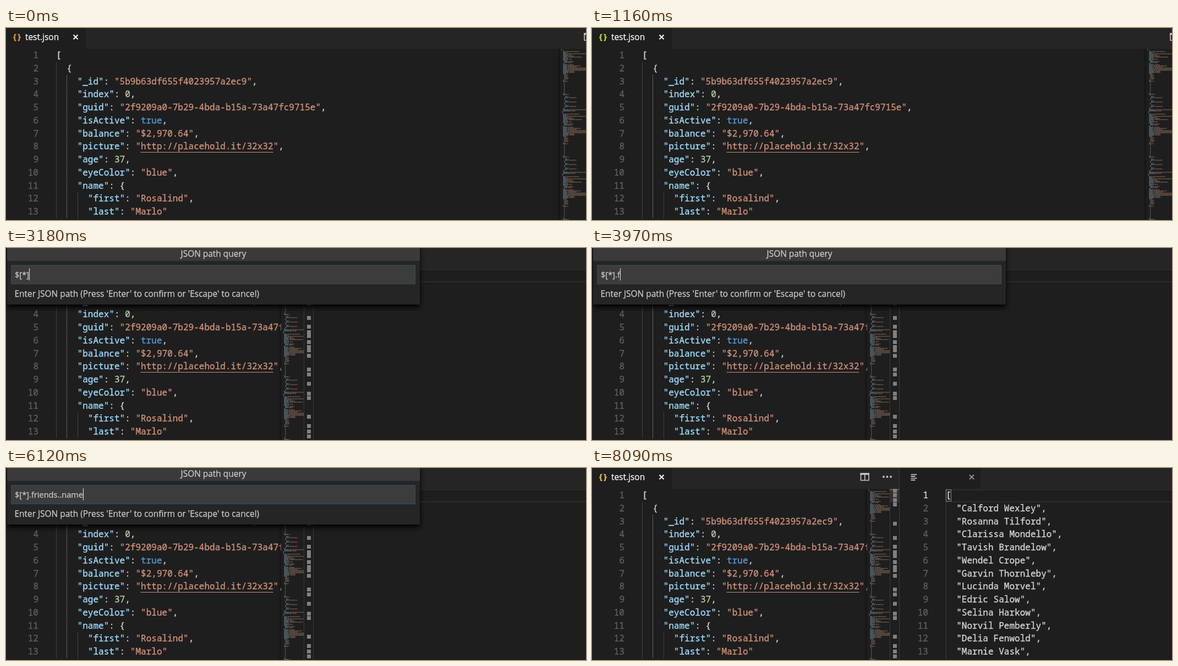
Recreate the animation shown at these times as an HTML page. Size 1054x350 px, loop 8.61 s.

```html
<!DOCTYPE html>
<html lang="en">
<head>
<meta charset="utf-8">
<title>JSON path query</title>
<style>
  html, body { margin: 0; width: 100%; height: 100%; overflow: hidden; background: #1e1e1e; }
  svg { display: block; width: 1054px; height: 350px; }
  text { white-space: pre; stroke-width: .35px; }
  .code { font: 16.04px "Noto Sans Mono", "DejaVu Sans Mono", monospace; fill: #d4d4d4; stroke: #d4d4d4; }
  .num { fill: #5f5f5f; stroke: #5f5f5f; text-anchor: end; }
  .active { fill: #d8d8d8; stroke: #d8d8d8; }
  .ui { font: 15.45px "Open Sans", "Noto Sans", sans-serif; fill: #ccc; stroke: #ccc; stroke-width: .25px; }
  .input { font-size: 14.6px; }
  .title { fill: #fff; stroke: #fff; }
  .braces { font-size: 14px; font-weight: 700; stroke-width: .6px; }
  .shadow { filter: drop-shadow(0 5px 5px #000); }
</style>
</head>
<body>
<svg id="stage" viewBox="0 0 1054 350"></svg>
<script>
const LOOP = 8610, CHAR = 9.624, ROW = 23.75, TOP = 38, BLINK = 460;
const stage = document.getElementById('stage');

function add(parent, tag, attrs = {}, text) {
  const node = document.createElementNS('http://www.w3.org/2000/svg', tag);
  for (const key in attrs) node.setAttribute(key, attrs[key]);
  if (text !== undefined) node.textContent = text;
  parent.append(node);
  return node;
}
const group = (parent, attrs) => add(parent, 'g', attrs);
const rect = (parent, x, y, width, height, fill, more) =>
  add(parent, 'rect', { x, y, width, height, fill, ...more });
const stroke = (parent, d, color, width = 1, more) =>
  add(parent, 'path', { d, stroke: color, 'stroke-width': width, fill: 'none', ...more });
const label = (parent, x, y, text, more) => add(parent, 'text', { x, y, class: 'ui', ...more }, text);
const show = (node, on) => node.setAttribute('visibility', on ? 'inherit' : 'hidden');

// Editor text
const doc = [
  '[',
  '  {',
  '    "_id": "5b9b63df655f4023957a2ec9",',
  '    "index": 0,',
  '    "guid": "2f9209a0-7b29-4bda-b15a-73a47fc9715e",',
  '    "isActive": true,',
  '    "balance": "$2,970.64",',
  '    "picture": "http://placehold.it/32x32",',
  '    "age": 37,',
  '    "eyeColor": "blue",',
  '    "name": {',
  '      "first": "Rosalind",',
  '      "last": "Marlo"'
];
const people = ['Calford Wexley', 'Rosanna Tilford', 'Clarissa Mondello', 'Tavish Brandelow',
  'Wendel Crope', 'Garvin Thornleby', 'Lucinda Morvel', 'Edric Salow', 'Selina Harkow',
  'Norvil Pemberly', 'Delia Fenwold', 'Marnie Vask'];
const friendDoc = ['[', '  ['];
people.slice(0, 3).forEach((name, id) =>
  friendDoc.push('    {', `      "id": ${id},`, `      "name": "${name}"`, '    },'));
const nameDoc = ['[', ...people.map(name => `  "${name}",`)];
const wrappedDoc = ['[', ...doc.map(line => '  ' + line)];

function tokenColor(token, rest) {
  if (token[0] === '"') return rest[0] === ':' ? '#9cdcfe' : '#ce9178';
  if (/^\d/.test(token)) return '#b5cea8';
  return token === 'true' ? '#569cd6' : '#d4d4d4';
}

function editor(parent, lines, x, numX, colored, activeLine) {
  const view = group(parent);
  lines.slice(0, 13).forEach((line, i) => {
    const top = TOP + i * ROW, y = top + 17;
    const indent = line.search(/\S/), body = line.trim();
    for (let level = 0; level < indent; level += 2) {
      const gx = Math.round(x + level * CHAR) + 0.5;
      stroke(view, `M${gx} ${top}v${ROW + 0.2}`, colored && level === 2 ? '#5c5c5c' : '#404040');
    }
    add(view, 'text', { x: numX, y, class: 'code num' + (i === activeLine ? ' active' : '') }, i + 1);
    const text = add(view, 'text', { x: x + indent * CHAR, y, class: 'code' });
    if (!colored) { text.textContent = body; return; }
    for (const m of body.matchAll(/"[^"]*"|\w+|[^"\w]+/g)) {
      const color = tokenColor(m[0], body.slice(m.index + m[0].length));
      add(text, 'tspan', { fill: color, stroke: color }, m[0]);
    }
  });
  return view;
}

// Minimap: one record is 57 short lines, drawn as dashes
function recordLines() {
  const lines = [[2, 0, 1]];
  const field = (indent, key, value) => lines.push([indent, key, value]);
  const close = indent => field(indent, 0, 2);
  [[5, 26], [7, 1], [6, 38], [10, 4], [9, 11], [9, 27], [5, 2], [10, 6], [6, 1]]
    .forEach(([key, value]) => field(4, key, value));
  field(6, 7, 10); field(6, 6, 7); close(4);
  [[9, 10], [7, 27], [7, 19], [9, 46], [7, 60], [12, 34], [10, 11], [11, 10]]
    .forEach(([key, value]) => field(4, key, value));
  field(4, 6, 1);
  for (let i = 0; i < 5; i++) field(6, 0, 5 + i * 3 % 5);
  close(4);
  field(4, 7, 1);
  for (let i = 0; i < 10; i++) field(6, 0, 1);
  close(4);
  field(4, 9, 1);
  for (let i = 0; i < 3; i++) { field(6, 0, 1); field(8, 4, 1); field(8, 6, 15); close(6); }
  close(4);
  field(4, 10, 52); field(4, 15, 8); close(2);
  return lines;
}

function minimap(parent, x, width) {
  const map = add(parent, 'svg', { x, y: TOP, width, height: 312 });
  rect(map, 0, 0, width, 312, '#1e1e1e');
  let keys = 'M2 1h1', values = '';
  for (let r = 0; r < 3; r++)
    recordLines().forEach(([indent, key, value], i) => {
      const y = 3 + (r * 57 + i) * 2, left = 2 + indent * 0.9;
      if (key) keys += `M${left} ${y}h${key * 0.9}`;
      const run = `M${left + (key ? key * 0.9 + 1.5 : 0)} ${y}h${value * 0.9}`;
      if (value > 2) values += run; else keys += run;
    });
  const dash = { 'stroke-dasharray': '2.2 .6 1.4 .5', opacity: 0.75 };
  stroke(map, keys, '#b4d8ea', 1.1, dash);
  stroke(map, values, '#d0a080', 1.1, dash);
  rect(parent, x - 6, TOP, 6, 312, 'url(#edge)');
}

const cross = (parent, x, y, color) =>
  stroke(parent, `M${x - 4} ${y - 4}l8 8m0 -8l-8 8`, color, 2.2);

function splitIcon(parent, x) {
  stroke(parent, `M${x + 1} 10v12.5h14.5v-12.5m-7.2 0v12.5`, '#c5c5c5', 1.6);
  rect(parent, x, 9, 16.5, 3.5, '#c5c5c5');
}

const defs = add(stage, 'defs');
const edge = add(defs, 'linearGradient', { id: 'edge' });
add(edge, 'stop', { offset: 0, 'stop-color': '#000', 'stop-opacity': 0 });
add(edge, 'stop', { offset: 1, 'stop-color': '#000', 'stop-opacity': 0.3 });

// Left editor
rect(stage, 0, 0, 1054, 350, '#1e1e1e');
rect(stage, 145, 0, 909, TOP, '#252526');
const braces = add(stage, 'text', { x: 11.5, y: 21, class: 'code braces' }, '{}');
label(stage, 35, 22, 'test.json', { class: 'ui title' });
cross(stage, 126.5, 16.5, '#f0f0f0');
editor(stage, doc, 91.1, 59, true);
stroke(stage, 'M244.5 226.5h241', '#ce9178');
const single = group(stage);
minimap(single, 1007, 47);
splitIcon(single, 1050);

// Right editor
const split = group(stage);
rect(split, 500, TOP, 554, 312, '#1e1e1e');
minimap(split, 500, 41);
splitIcon(split, 487.5);
for (let i = 0; i < 3; i++) add(split, 'circle', { cx: 530 + i * 6.5, cy: 16, r: 1.9, fill: '#c5c5c5' });
rect(split, 541, TOP, 17, 312, '#1e1e1e');
stroke(split, `M541.5 ${TOP}v312`, '#3a3a3a');
stroke(split, 'M541 39.5h17', '#686868', 2);
for (const y of [38, 46, 55, 63, 98, 124, 140, 150, 157, 168, 193, 218, 227, 244, 262, 270, 304, 321, 331, 340])
  rect(split, 547, y, 7, 7, '#808080');
rect(split, 547, 177, 7, 13, '#808080');
const slider = rect(split, 542, 41, 16, 22, '#797979', { opacity: 0.2 });
rect(split, 558, 0, 1, 350, '#3a3a3a');
rect(split, 559, 0, 147, TOP, '#1e1e1e');
stroke(split, 'M579.5 11.7h11m-11 3.4h8m-8 3.4h11m-11 3.4h8', '#d0d0d0', 1.6);
cross(split, 690, 16.5, '#8a8a8a');
rect(split, 643, 39.5, 440, 22, 'none', { stroke: '#2c2c2c', 'stroke-width': 2 });
const views = {
  empty: editor(split, [''], 643, 611, false, 0),
  whole: editor(split, wrappedDoc, 652.6, 620.5, false, 0),
  items: editor(split, doc, 652.6, 620.5, false, 0),
  friends: editor(split, friendDoc, 652.6, 620.5, false, 0),
  names: editor(split, nameDoc, 643, 611, false, 0)
};
// Matching bracket box
rect(views.names, 643.5, 39.5, 9, 21, 'none', { stroke: '#888' });

// Command list
const palette = group(stage);
rect(palette, 2, 2, 750, 360, '#252526', { class: 'shadow' });
rect(palette, 9, 9, 735, 35, '#3c3c3c');
label(palette, 16, 32, '>', { class: 'ui input' });
const paletteCaret = rect(palette, 26, 15, 1, 22, '#e0e0e0');
rect(palette, 2, 51, 750, 27.5, '#094771');
['JSON path query', 'Format Document', 'Change Language Mode', 'Toggle Word Wrap', 'Reload Window',
  'Open User Settings', 'Fold All', 'Unfold All', 'Go to Line...', 'Split Editor', 'Close Editor']
  .forEach((name, i) => label(palette, 16, 70 + i * 27.5, name));

// Query prompt
const prompt = group(stage);
rect(prompt, 2, -6, 750, 109, '#252526', { class: 'shadow' });
rect(prompt, 2, 0, 750, 23.5, '#3a3a3b');
label(prompt, 377, 16, 'JSON path query', { 'text-anchor': 'middle' });
rect(prompt, 9.5, 31.5, 734, 34, '#3c3c3c', { stroke: '#265069' });
const query = label(prompt, 16, 54, '', { class: 'ui input' });
label(prompt, 15.5, 89, "Enter JSON path (Press 'Enter' to confirm or 'Escape' to cancel)");
const caret = rect(prompt, 16, 37, 1, 22, '#e8e8e8');

// Timeline
const typing = [[1240, ''], [2100, '$'], [2730, '$['], [3040, '$[*'], [3180, '$[*]'], [3650, '$[*].']];
function type(start, end, word) {
  const base = typing[typing.length - 1][1];
  for (let i = 0; i < word.length; i++)
    typing.push([start + (end - start) * i / (word.length - 1), base + word.slice(0, i + 1)]);
}
type(3970, 4660, 'friends');
type(5430, 6120, '..name');
typing.push([6210, '$[*].friends..name']);

const results = [[0, 'empty'], [2400, 'whole'], [2730, 'empty'], [3410, 'items'], [3650, 'empty'],
  [4880, 'friends'], [5430, 'empty'], [6280, 'names']];
const iconColors = [[0, '#d7954a'], [460, '#cbcb41'], [2100, '#e0bd4c']];

const latest = (steps, t) => steps.filter(step => step[0] <= t).pop() || steps[0];
const blinkOn = elapsed => Math.floor(elapsed / BLINK) % 2 === 0;

function render(t) {
  const isSplit = t >= 2170;
  show(single, !isSplit);
  show(split, isSplit);
  const result = latest(results, t)[1];
  for (const name in views) show(views[name], name === result);
  show(slider, t >= 8090);
  braces.style.fill = braces.style.stroke = latest(iconColors, t)[1];

  show(palette, t >= 460 && t < 1160);
  show(paletteCaret, blinkOn(t - 460));

  const [typedAt, text] = latest(typing, t);
  show(prompt, t >= 1240 && t < 7050);
  if (query.textContent !== text) query.textContent = text;
  caret.setAttribute('x', Math.round(16 + (text ? query.getComputedTextLength() : 0)));
  show(caret, blinkOn(t - typedAt));
}

const start = performance.now();
function frame() {
  render((performance.now() - start) % LOOP);
  requestAnimationFrame(frame);
}
frame();
</script>
</body>
</html>
```
